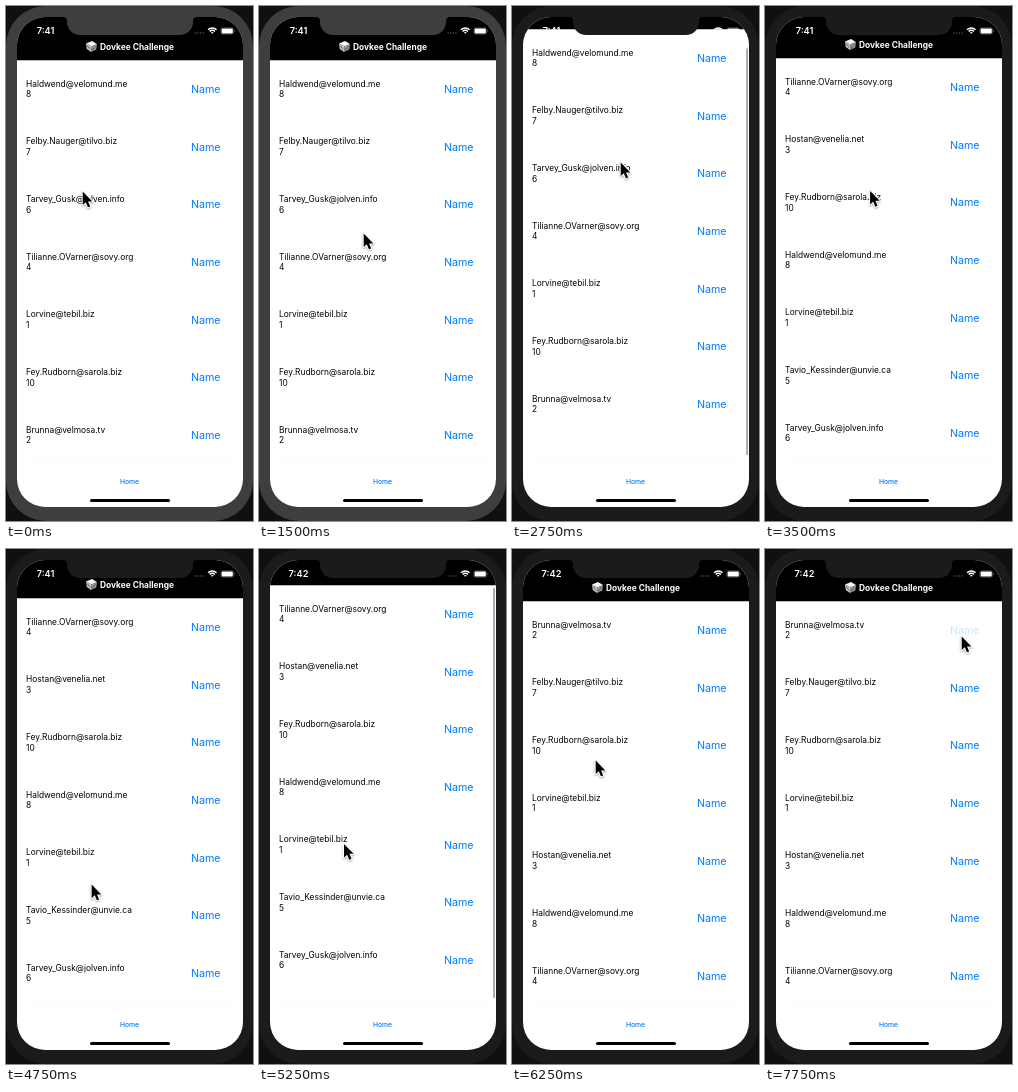
These frames come from a looping animation (247x515 px, 8000 ms). An HTML page with a canvas:

```html
<!DOCTYPE html>
<html lang="en">
<head>
<meta charset="utf-8">
<title>User list</title>
<style>
  html, body { margin: 0; width: 100%; height: 100%; overflow: hidden; background: #101010; }
  canvas { display: block; width: 247px; height: 515px; }
</style>
</head>
<body>
<canvas></canvas>
<script>
const W = 247, H = 515, LOOP = 8000, STEP = 250, BLUE = '#007aff';
const canvas = document.querySelector('canvas');
const ctx = canvas.getContext('2d');
const ratio = window.devicePixelRatio || 1;
canvas.width = W * ratio;
canvas.height = H * ratio;

const emails = {
  1: 'Lorvine@tebil.biz',
  2: 'Brunna@velmosa.tv',
  3: 'Hostan@venelia.net',
  4: 'Tilianne.OVarner@sovy.org',
  5: 'Tavio_Kessinder@unvie.ca',
  6: 'Tarvey_Gusk@jolven.info',
  7: 'Felby.Nauger@tilvo.biz',
  8: 'Haldwend@velomund.me',
  10: 'Fey.Rudborn@sarola.biz'
};

// Each pull past the end reshuffles the list
const shuffles = [
  { from: 0, ids: [8, 7, 6, 4, 1, 10, 2] },
  { from: 3500, ids: [4, 3, 10, 8, 1, 5, 6] },
  { from: 6250, ids: [2, 7, 10, 1, 3, 8, 4] }
];

const moves = [
  { start: 0, end: 250, x: 88, y: 180 },
  { start: 750, end: 1500, x: 104, y: 226 },
  { start: 2000, end: 2750, x: 108, y: 155 },
  { start: 3250, end: 4250, x: 85, y: 337 },
  { start: 4600, end: 6250, x: 83, y: 210 },
  { start: 6250, end: 7500, x: 196, y: 86 }
];

const ramp = (t, start, end) => Math.min(1, Math.max(0, (t - start) / (end - start)));
const smooth = p => p * p * (3 - 2 * p);

function cursorAt(t) {
  let x = 76, y = 184;
  for (const m of moves) {
    const p = smooth(ramp(t, m.start, m.end));
    x += (m.x - x) * p;
    y += (m.y - y) * p;
  }
  return [x, y];
}

// Dragged up evenly, held, then released to spring back
const pull = (t, start, top, release) => ramp(t, start, top) - smooth(ramp(t, release, release + 500));

function scrollAt(t) {
  const rest = 2 * ramp(t, 2000, 2750);
  return Math.round(rest + 29 * (pull(t, 2000, 2750, 3000) + pull(t, 4620, 5750, 5750)));
}

function text(str, x, y, size, color, weight = 400, align = 'left') {
  ctx.font = `${weight} ${size}px Inter, sans-serif`;
  ctx.fillStyle = color;
  ctx.textAlign = align;
  ctx.fillText(str, x, y);
}

function rounded(x, y, w, h, r) {
  ctx.beginPath();
  ctx.roundRect(x, y, w, h, r);
}

function box(x, y, w, h, r, color) {
  ctx.fillStyle = color;
  rounded(x, y, w, h, r);
  ctx.fill();
}

function shape(path, color) {
  ctx.fillStyle = color;
  ctx.fill(new Path2D(path));
}

function drawDie(x, y) {
  ctx.save();
  ctx.translate(x, y);
  shape('M0 2.5 6 0 11 3 5.5 5.5Z', '#f4f4f4');
  shape('M0 2.5 5.5 5.5 5 11 .8 8Z', '#c9c9c9');
  shape('M5.5 5.5 11 3 10.2 8.5 5 11Z', '#9a9a9a');
  for (let i = 0; i < 3; i++) {
    box(1.3 + i, 4.6 + i * 1.4, 1.2, 1.2, .6, '#333');
    box(6.2 + i, 8.2 - i * 1.5, 1.2, 1.2, .6, '#333');
  }
  ctx.restore();
}

function drawRows(ids, scroll, pressed) {
  ids.forEach((id, i) => {
    const y = 78 - scroll + i * 57.67;
    text(emails[id], 20, y + 2.8, 8.4, '#000');
    text(id, 20, y + 13.2, 8.4, '#000');
    text('Name', 199.7, y + 9, 10.7, pressed && i === 0 ? '#cce4ff' : BLUE, 400, 'center');
  });
}

function drawHeader(scroll) {
  const bottom = 54 - scroll;
  ctx.fillStyle = '#000';
  ctx.fillRect(11, 11, 226, bottom - 11);
  ctx.fillStyle = '#bbb';
  ctx.fillRect(11, bottom, 226, 1);
  drawDie(80, 35 - scroll);
  text('Dovkee Challenge', 94, 43.5 - scroll, 8.4, '#fff', 700);
}

function drawStatus(clock) {
  const faint = 'rgba(255,255,255,.35)';
  text(clock, 39.5, 28.2, 9.2, '#fff', 600, 'center');
  for (let i = 0; i < 4; i++) box(188.5 + i * 2.6, 26.3, 1.4, 1.4, .7, faint);
  ctx.strokeStyle = '#fff';
  ctx.lineWidth = 1.4;
  for (const r of [6, 3.7, 1.3]) {
    ctx.beginPath();
    ctx.arc(206.3, 28, r, -Math.PI * .75, -Math.PI * .25);
    ctx.stroke();
  }
  ctx.lineWidth = .7;
  ctx.strokeStyle = faint;
  rounded(214.8, 21.8, 12.8, 6.4, 1.8);
  ctx.stroke();
  box(215.6, 22.6, 11.2, 4.8, 1, '#fff');
  box(228.3, 24, .8, 2, .4, faint);
}

function drawCursor(x, y) {
  const arrow = new Path2D('M0 0V15.8L3.6 12.5 6.1 18.4 8.7 17.3 6.2 11.5H11.2Z');
  ctx.save();
  ctx.translate(x + .7, y + 1.5);
  ctx.scale(.86, .86);
  ctx.lineJoin = 'round';
  ctx.shadowColor = 'rgba(0,0,0,.35)';
  ctx.shadowBlur = 2 * ratio;
  ctx.shadowOffsetY = ratio;
  ctx.strokeStyle = '#fff';
  ctx.lineWidth = 2.4;
  ctx.stroke(arrow);
  ctx.shadowColor = 'transparent';
  ctx.fillStyle = '#000';
  ctx.fill(arrow);
  ctx.restore();
}

function draw(t) {
  const scroll = scrollAt(t);
  const { ids } = shuffles.findLast(s => s.from <= t);
  const bezel = t < 2250 ? '#3e3e3e' : '#1b1b1b';

  ctx.setTransform(ratio, 0, 0, ratio, 0, 0);
  ctx.fillStyle = '#101010';
  ctx.fillRect(0, 0, W, H);
  box(0, 0, W, H, 40, bezel);

  ctx.save();
  rounded(11, 11, 226, 490, 28);
  ctx.clip();
  ctx.fillStyle = '#fff';
  ctx.fillRect(11, 11, 226, 490);

  ctx.save();
  ctx.beginPath();
  ctx.rect(11, 11, 226, 438);
  ctx.clip();
  drawRows(ids, scroll, t >= 7750);
  drawHeader(scroll);
  if (scroll > 5) {
    const top = 34 + scroll * .27;
    box(234.4, top, 1.3, 449 - top, .6, '#808080');
  }
  ctx.restore();

  drawStatus(t < 5000 ? '7:41' : '7:42');
  ctx.fillStyle = '#fafafa';
  ctx.fillRect(20, 452, 210, 1);
  text('Home', 123.5, 478, 6.8, BLUE, 500, 'center');
  box(84, 493, 80, 3, 1.5, '#000');
  ctx.restore();

  shape('M57 10V11A4 4 0 0 1 61 15V16A13 13 0 0 0 74 29H174A13 13 0 0 0 187 16V15A4 4 0 0 1 191 11V10Z', bezel);
  drawCursor(...cursorAt(t));
}

function tick() {
  const t = performance.now() % LOOP;
  draw(Math.floor(t / STEP) * STEP);
  requestAnimationFrame(tick);
}
tick();
</script>
</body>
</html>
```
